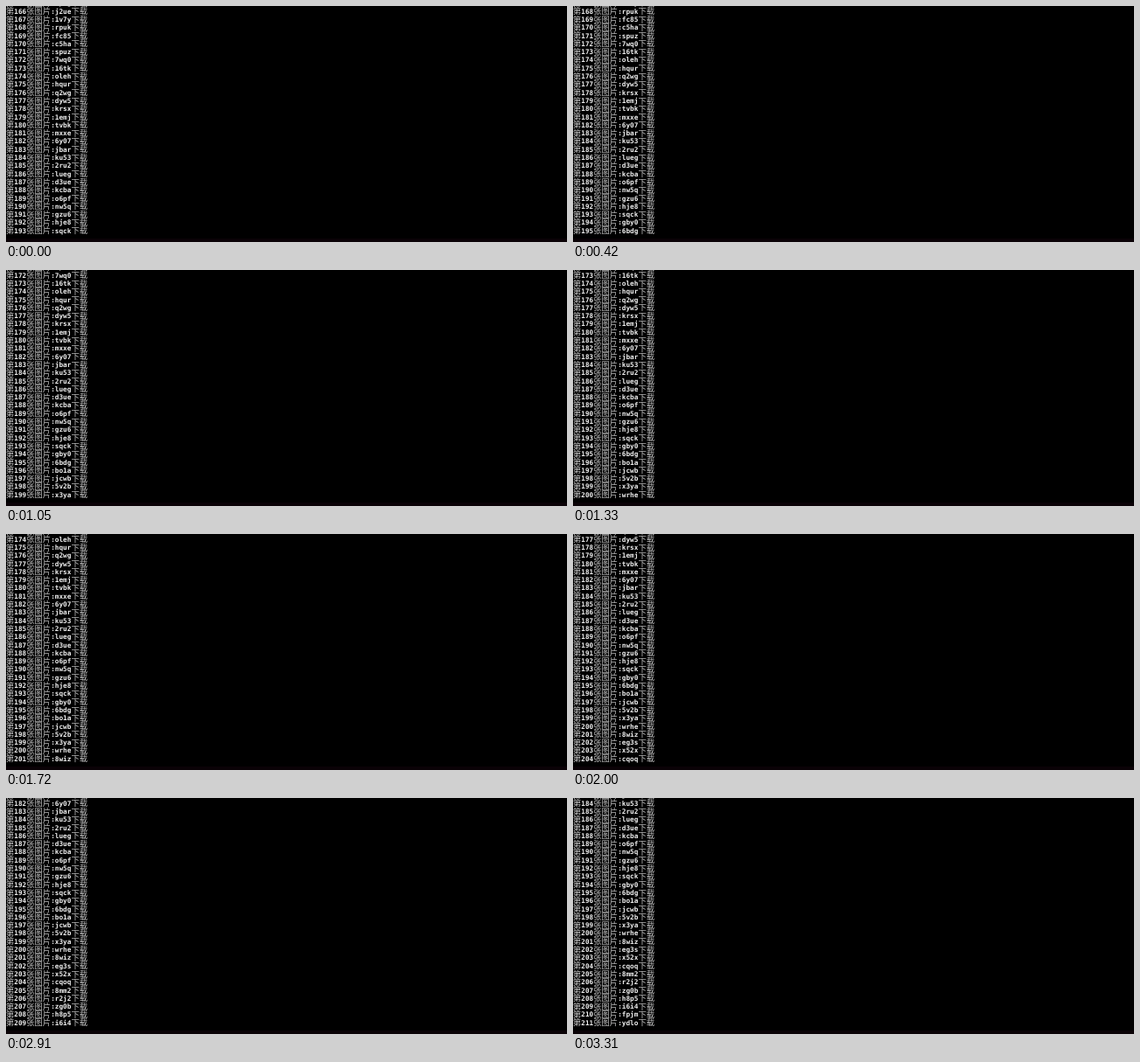
An HTML page with a canvas for the animation above (3410 ms loop, 640x270 px).

```html
<!DOCTYPE html>
<html lang="zh-CN">
<head>
<meta charset="utf-8">
<style>
html, body { margin: 0; width: 100%; height: 100%; overflow: hidden; background: #000; }
canvas { display: block; }
</style>
</head>
<body>
<canvas id="screen" width="640" height="270"></canvas>
<script>
const ctx = document.getElementById('screen').getContext('2d');

const LOOP = 3410, FIRST = 165, START = 193, ROWS = 29;
const COL = 4.65, ROW = 9.3, BASE = 259.7;
const LATIN = 'bold 7.72px "DejaVu Sans Mono", "Liberation Mono", monospace';
const HAN = '9.3px "Noto Sans CJK SC", "Noto Sans CJK", sans-serif';

const codes = ('mp3g j2ue 1v7y rpuk fc85 c5ha spuz 7wq0 16tk oleh hqur q2wg dyw5 krsx 1emj tvbk ' +
  'mxxe 6y07 jbar ku53 2ru2 lueg d3ue kcba o6pf nw5q gzu6 hje8 sqck gby0 6bdg bo1a jcwb 5v2b ' +
  'x3ya wrhe 8wiz eg3s x52x cqoq 8mm2 r2j2 zg0b h8p5 i6i4 fpjm ydlo').split(' ');

// Each entry is the moment one more line is printed.
const prints = [150, 420, 540, 660, 930, 1050, 1330, 1480, 1730, 1850, 2000,
  2270, 2400, 2520, 2790, 2910, 3190, 3310];

function put(text, col, y, font, color) {
  ctx.font = font;
  ctx.fillStyle = color;
  ctx.fillText(text, col * COL, y);
}

function drawLine(n, y) {
  const han = (text, col) => put(text, col, y + 0.6, HAN, '#c4c4c4');
  const latin = (text, col) => put(text, col, y, LATIN, '#f0f0f0');
  han('第', 0);
  latin(n, 2);
  han('张图片', 5);
  latin(':' + codes[n - FIRST], 11);
  han('下载', 16);
}

let shown;
function frame(now) {
  const t = now % LOOP;
  const last = START + prints.filter(p => p <= t).length;
  if (last !== shown) {
    shown = last;
    ctx.fillStyle = '#000';
    ctx.fillRect(0, 0, 640, 270);
    ctx.fillStyle = '#0a0206';
    ctx.fillRect(0, 266, 640, 4);
    for (let i = 0; i < ROWS; i++) drawLine(last - i, BASE - i * ROW);
  }
  requestAnimationFrame(frame);
}
frame(0);
</script>
</body>
</html>
```
